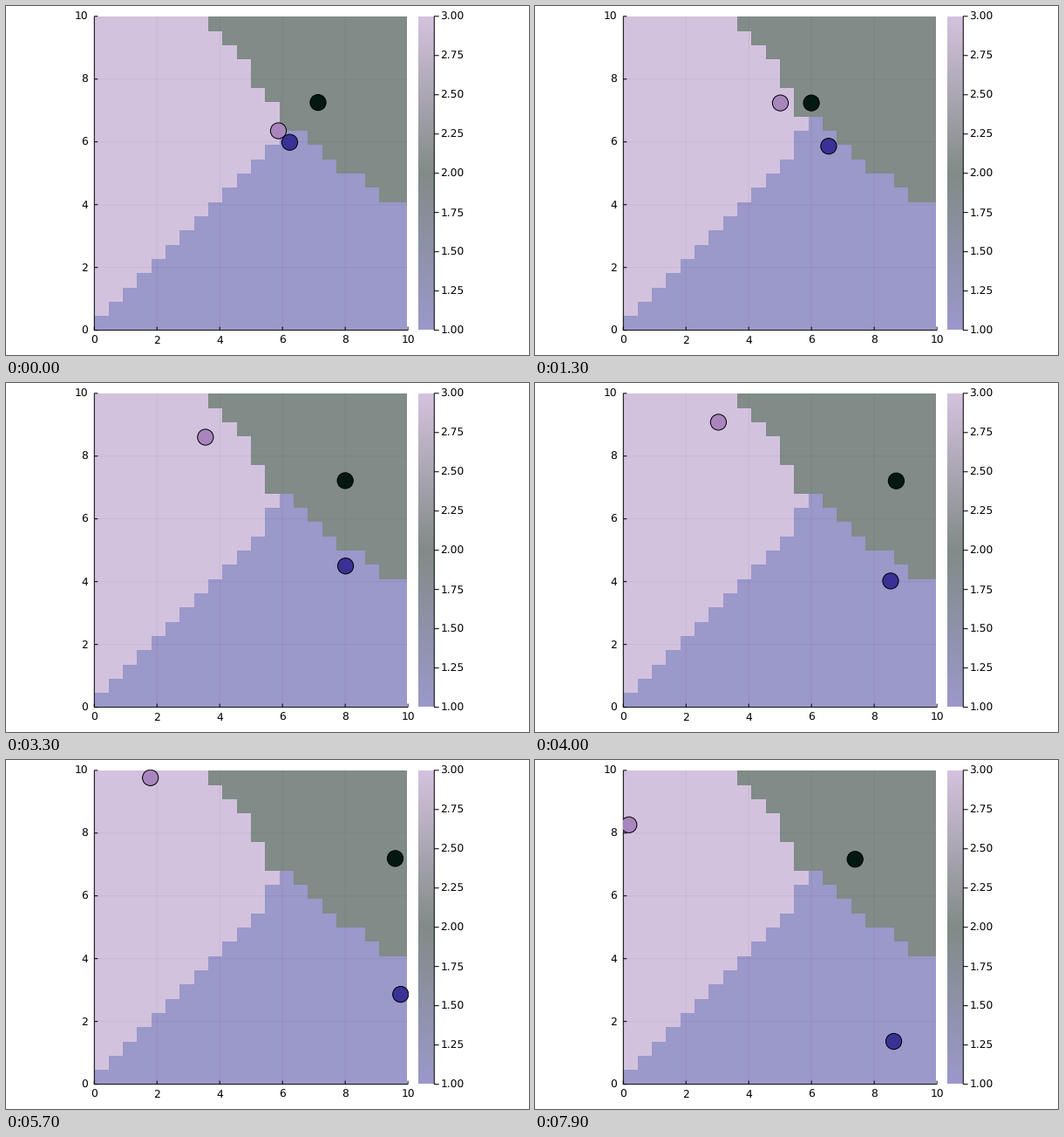
Animation, 600 px wide and 400 px high, one loop 8000 ms. Source, as a matplotlib script:

```python
import numpy as np
import matplotlib.pyplot as plt
from matplotlib.animation import FuncAnimation
from matplotlib.patches import Circle, Rectangle

W, H, DPI = 600, 400, 100
FRAMES, STEP = 80, 100
PX = 72 / DPI                       # one pixel in points
N, SIDE = 22, 359                   # cells per side, heatmap size in pixels
LEFT, TOP, RIGHT, BOTTOM = 101.3, 11.8, 461.1, 371.6
UNIT = (RIGHT - LEFT) / 10

BLUE, DARK, LILAC = range(3)
BALL = np.array([(56, 50, 150), (4, 24, 17), (169, 133, 189)]) / 255
TINT = (BALL + 1) / 2

plt.rcParams["font.family"] = "DejaVu Sans"
plt.rcParams["text.hinting"] = "none"
fig = plt.figure(figsize=(W / DPI, H / DPI), dpi=DPI, facecolor="white")
ax = fig.add_axes([0, 0, 1, 1])


def base_grid():
    """Owner of every cell, row 0 at the bottom."""
    tops = list(range(1, 14)) + [14, 14, 13, 12, 11, 11, 10, 9, 9]
    edges = [13] * 16 + [12, 11, 11, 10, 9, 8]
    row, col = np.mgrid[:N, :N]
    grid = np.full((N, N), DARK)
    grid[col < np.array(edges)[row]] = LILAC
    grid[row < np.array(tops)[col]] = BLUE
    return grid


GRID = base_grid()
# (time, row, column, new owner) of each captured cell
CAPTURES = [(0.6, 14, 13, LILAC), (4.3, 13, 12, BLUE),
            (5.5, 14, 13, BLUE), (12.2, 15, 12, DARK)]
CELL = np.arange(SIDE) * N // SIDE


def heatmap(t):
    grid = GRID.copy()
    for when, row, col, owner in CAPTURES:
        if t >= when:
            grid[row, col] = owner
    return TINT[grid[::-1][np.ix_(CELL, CELL)]]


def bounce(start, speed, t, lo, hi):
    """Linear motion reflected between two walls."""
    span = hi - lo
    u = (start + speed * t - lo) % (2 * span)
    return lo + min(u, 2 * span - u)


VX, VY = 2.632, 2.452
WALL, CEIL = 314.1, 142.5           # edges of the contested cells


def position(owner, t):
    if owner == BLUE:
        return (bounce(325.5, -VX, t, WALL, RIGHT),
                bounce(156.2, -VY, t, CEIL, BOTTOM))
    if owner == DARK:
        return bounce(358, -3.605, t, WALL, RIGHT), 110.6 + 0.04 * t
    return (bounce(312.5, VX, t, LEFT, WALL),
            bounce(143, -VY, t, TOP, BOTTOM))


def line(x0, y0, x1, y1, **kw):
    ax.plot([x0, x1], [y0, y1], lw=PX, color="black",
            solid_capstyle="butt", snap=False, **kw)


def label(x, y, text, ha):
    ax.text(x, y, text, ha=ha, va="baseline", fontsize=12.3 * PX, color="black")


field = ax.imshow(heatmap(0), extent=(101, 460, 371, 12),
                  interpolation="nearest", aspect="auto", zorder=1)

# colour bar
level = np.linspace(2, 0, SIDE)
ramp = np.stack([np.interp(level, range(3), TINT[:, k]) for k in range(3)], axis=-1)
ax.imshow(ramp[:, None], extent=(473, 491, 371, 12),
          interpolation="nearest", aspect="auto", zorder=1)
line(491.3, TOP, 491.3, BOTTOM, zorder=3)
for k in range(9):
    y = BOTTOM - k * (BOTTOM - TOP) / 8
    line(491, y, 496.7, y, zorder=3)
    label(498.4, y + 4, f"{1 + k / 4:.2f}", "left")

# axes and grid
line(LEFT, BOTTOM, RIGHT, BOTTOM, zorder=3)
line(LEFT, TOP, LEFT, BOTTOM, zorder=3)
for v in range(0, 11, 2):
    x, y = LEFT + v * UNIT, BOTTOM - v * UNIT
    line(x, BOTTOM, x, BOTTOM - 4, zorder=3)
    line(LEFT, y, LEFT + 4, y, zorder=3)
    if 0 < v < 10:
        line(x, 12, x, 371, alpha=0.045, zorder=2)
        line(101, y, 460, y, alpha=0.045, zorder=2)
    label(x, 387.3, str(v), "center")
    label(93.8, y + 4, str(v), "right")

ax.set(xlim=(0, W), ylim=(H, 0))
ax.axis("off")

frame = Rectangle((101, 11), 361, 361, transform=ax.transData)
balls = []
for owner in (BLUE, DARK, LILAC):
    ball = Circle(position(owner, 0), 9.1, fc=BALL[owner], ec="black",
                  lw=PX, zorder=4 + owner)
    ax.add_patch(ball)
    ball.set_clip_path(frame)
    balls.append(ball)


def update(t):
    field.set_data(heatmap(t))
    for owner, ball in enumerate(balls):
        ball.center = position(owner, t)
    return [field, *balls]


anim = FuncAnimation(fig, update, frames=FRAMES, interval=STEP,
                     repeat=True, repeat_delay=0, blit=False)
plt.show()
```
